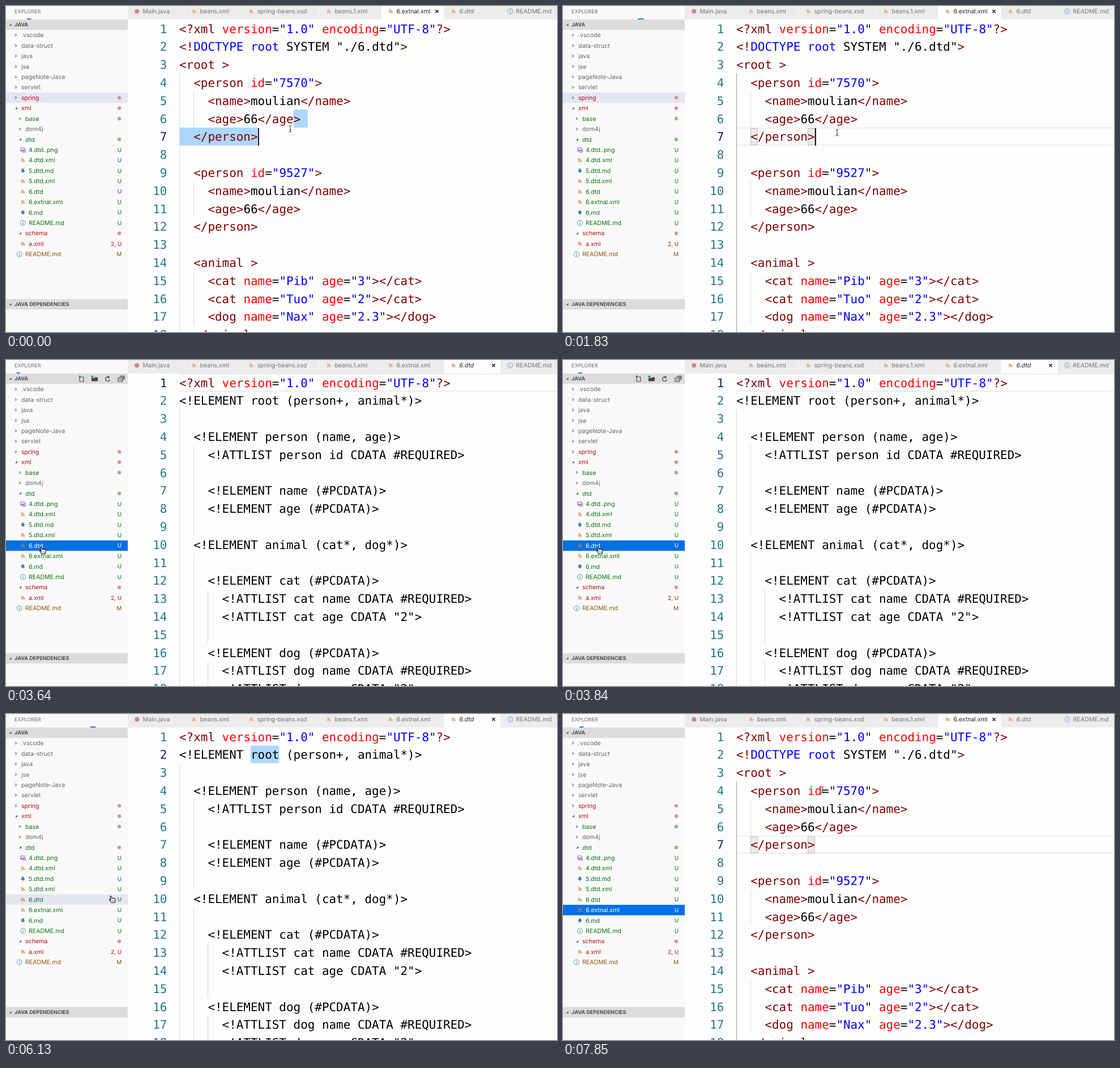
Recreate the animation shown at these times as an HTML page with a canvas. Size 973 by 576 pixels, loop 8 s.

```html
<!DOCTYPE html>
<html>
<head>
<meta charset="utf-8">
<style>
html, body { margin: 0; width: 973px; height: 576px; overflow: hidden; background: #fdfdfd; }
canvas { display: block; }
</style>
</head>
<body>
<canvas id="stage" width="973" height="576"></canvas>
<script>
const c = document.getElementById('stage').getContext('2d');
const LOOP = 8000, X = 306, CW = 12.6, LH = 31.8, ROW = 18.43;
const UI = '10.6px Inter, sans-serif', HEAD = 'bold 9.1px Inter, sans-serif';
const CODE = '20.93px "DejaVu Sans Mono", monospace';
const GREEN = '#0a750a', RED = '#b60d0d', GRAY = '#666', AMBER = '#895503';

// screen updates: [first, last, count]
const UPDATES = [[0, 0, 1], [440, 1360, 7], [1510, 2280, 6], [2610, 3190, 5], [3640, 4640, 7],
  [4790, 5690, 7], [5840, 6870, 8], [7040, 7250, 2], [7520, 7850, 3]];
// pointer path: [time, x, y]
const PATH = [[0, 502, 217], [440, 502, 217], [900, 518, 212], [1360, 490, 222], [1818, 484, 224],
  [2280, 400, 310], [2600, 200, 420], [2900, 66, 338], [3807, 65, 337], [4100, 65, 337],
  [4640, 380, 110], [4900, 460, 74], [5690, 460, 74], [6134, 188, 328], [6430, 188, 328],
  [6800, 100, 354], [7250, 100, 354], [7520, 300, 270], [7850, 458, 134], [LOOP, 458, 134]];

const XML = `<?xml version="1.0" encoding="UTF-8"?>
<!DOCTYPE root SYSTEM "./6.dtd">
<root >
  <person id="7570">
    <name>moulian</name>
    <age>66</age>
  </person>

  <person id="9527">
    <name>moulian</name>
    <age>66</age>
  </person>

  <animal >
    <cat name="Pib" age="3"></cat>
    <cat name="Tuo" age="2"></cat>
    <dog name="Nax" age="2.3"></dog>
  </animal>`.split('\n');

const DTD = `<?xml version="1.0" encoding="UTF-8"?>
<!ELEMENT root (person+, animal*)>

  <!ELEMENT person (name, age)>
    <!ATTLIST person id CDATA #REQUIRED>

    <!ELEMENT name (#PCDATA)>
    <!ELEMENT age (#PCDATA)>

  <!ELEMENT animal (cat*, dog*)>

    <!ELEMENT cat (#PCDATA)>
      <!ATTLIST cat name CDATA #REQUIRED>
      <!ATTLIST cat age CDATA "2">

    <!ELEMENT dog (#PCDATA)>
      <!ATTLIST dog name CDATA #REQUIRED>
      <!ATTLIST dog age CDATA "2">`.split('\n');

// indent guides: [column, first line, last line]
const XML_GUIDES = [[0, 4, 18], [2, 5, 6], [2, 10, 11], [2, 15, 17]];
const DTD_GUIDES = [[0, 3, 18], [2, 5, 9], [2, 11, 18], [4, 13, 15], [4, 17, 18]];

// tree rows: [label, text x, icon, colour, status]
const TREE = [
  ...['.vscode', 'data-struct', 'java', 'jse', 'pageNote-Java', 'servlet'].map(n => [n, 27, 'shut', GRAY]),
  ['spring', 27, 'shut', RED, 'dot'], ['xml', 27, 'open', RED, 'dot'],
  ['base', 34, 'shut', GREEN, 'dot'], ['dom4j', 34, 'shut', GRAY], ['dtd', 34, 'open', GREEN, 'dot'],
  ...[['4.dtd..png', 'image'], ['4.dtd.xml', 'feed'], ['5.dtd.md', 'down'], ['5.dtd.xml', 'feed'],
    ['6.dtd', 'feed'], ['6.extnal.xml', 'feed'], ['6.md', 'down'], ['README.md', 'info']]
    .map(([n, icon]) => [n, 40, icon, GREEN, 'U']),
  ['schema', 34, 'open', RED, 'dot'], ['a.xml', 40, 'feed', RED, '2, U'], ['README.md', 34, 'info', AMBER, 'M']
];
// tabs: [label, left, icon]
const TABS = [['Main.java', 215, 'disc'], ['beans.xml', 316, 'feed'], ['spring-beans.xsd', 417, 'feed'],
  ['beans.1.xml', 554, 'feed'], ['6.extnal.xml', 663, 'feed'], ['6.dtd', 774, 'feed'], ['README.md', 874, 'info']];

const HAND = new Path2D('M-4.3-5.6c.8-1.2 2-.6 2.3.4l.9 2.7 1.5-.3 1.7.4 1.7.5c1.1.4 1.4 1.6 1.3 2.8l-.4 2.2-1 2.2h-5.4l-3.7-4.3c-.8-1.1.4-2.1 1.5-1.2l1 .8z');

function rect(x, y, w, h, color) {
  c.fillStyle = color;
  c.fillRect(x, y, w, h);
}
function text(str, x, y, font, color, align = 'left') {
  c.font = font;
  c.fillStyle = color;
  c.textAlign = align;
  c.fillText(str, x, y);
}
// filled shape, or an outline when a width is given
function path(d, x, y, color, width) {
  c.save();
  c.translate(x, y);
  const p = new Path2D(d);
  c.fillStyle = c.strokeStyle = color;
  if (width) {
    c.lineWidth = width;
    c.stroke(p);
  } else c.fill(p);
  c.restore();
}
function disc(x, y, r, color) {
  c.fillStyle = color;
  c.beginPath();
  c.arc(x, y, r, 0, 7);
  c.fill();
}

const ICONS = {
  shut: (x, y) => path('M-1.3-2.2L1.6 0-1.3 2.2z', x, y, '#777', 0.9),
  open: (x, y) => path('M2-2.2V1.8H-2z', x, y, '#555'),
  feed: (x, y) => {
    path('M-3-2.8A5.8 5.8 0 0 1 2.8 3M-3-.4A3.4 3.4 0 0 1 .4 3', x, y, '#e37933', 1.2);
    disc(x - 2.2, y + 2.2, 0.9, '#e37933');
  },
  down: (x, y) => path('M-2.2-4L0-3 2.2-4V-.2H4.2L0 4-4.2-.2H-2.2z', x, y, '#3f86ad'),
  info: (x, y) => {
    path('M4.6 0A4.6 4.6 0 1 1-4.6 0 4.6 4.6 0 1 1 4.6 0', x, y, '#3f8fba', 0.9);
    path('M0-2.8V-1.5M0-.6V2.8', x, y, '#3f8fba', 1.2);
  },
  image: (x, y) => {
    path('M-4-3.5H2.5V2H-4zM-2 4H4.5V-1.5', x, y, '#8d66b5', 1.1);
    path('M-3.5 1.5L-1.5-1 0 .5 1-.5 2.2 1.5z', x, y, '#8d66b5');
  },
  disc: (x, y) => disc(x, y, 4, '#cc6b6e')
};

function pointerAt(t) {
  const i = Math.max(1, PATH.findIndex(p => p[0] >= t));
  const [t0, x0, y0] = PATH[i - 1], [t1, x1, y1] = PATH[i];
  const k = Math.max(0, (t - t0) / (t1 - t0));
  return [x0 + (x1 - x0) * k, y0 + (y1 - y0) * k];
}

function lastUpdate(t) {
  let s = 0;
  for (const [a, b, n] of UPDATES)
    for (let i = 0; i < n; i++) {
      const u = a + (b - a) * i / Math.max(1, n - 1);
      if (u <= t + 12) s = u;
    }
  return s;
}

function tokenColor(tok, doctype) {
  if (doctype) return tok[0] === 'D' ? '#0000ff' : '#800000';
  if (tok[0] === '"') return '#0000ff';
  return /^[<?\/>]/.test(tok) ? '#800000' : '#ff0000';
}
function codeLine(line, y) {
  const doctype = line.startsWith('<!D');
  const rule = doctype ? /(<!|DOCTYPE root|>)/
    : line.includes('<!') ? /(?!)/ : /("[^"]*"|\w+(?==)|<[?\/]?\w+|[?\/]?>)/;
  let col = 0;
  line.split(rule).forEach((tok, i) => {
    text(tok, X + col * CW, y, CODE, i % 2 ? tokenColor(tok, doctype) : '#000');
    col += tok.length;
  });
}

const lineTop = n => 24 + LH * (n - 1);

function editor(s, dtd, treeFocus) {
  const selecting = s < 1660;
  const current = !dtd ? 7 : s < 5090 ? 1 : 2;
  rect(215, 0, 758, 576, '#fdfdfd');

  if (dtd ? current === 1 : !selecting) {
    rect(X, lineTop(current), 667, 1.4, '#e8e8e8');
    rect(X, lineTop(current) + LH - 1.4, 667, 1.4, '#e8e8e8');
  }
  if (!dtd && selecting) {
    rect(X + 16 * CW, lineTop(6), 2 * CW, LH, '#add6ff');
    rect(X, lineTop(7), 11 * CW, LH, '#add6ff');
  }
  if (dtd && current === 2) rect(X + 10 * CW, lineTop(2), 4 * CW, LH - 0.8, treeFocus ? '#e5ebf1' : '#add6ff');

  for (const [col, a, b] of dtd ? DTD_GUIDES : XML_GUIDES) {
    const active = !dtd && !selecting && col === 0;
    rect(Math.floor(X + col * CW), lineTop(a), 1, LH * (b - a + 1), active ? '#999' : '#dadada');
  }
  if (!dtd && !selecting) for (const col of [2, 10]) {
    const x = Math.floor(X + col * CW);
    rect(x, 216, 13, 30, '#bbb');
    rect(x + 1, 217, 11, 28, '#e7ece7');
  }
  (dtd ? DTD : XML).forEach((line, i) => {
    const y = 47.5 + LH * i;
    text(i + 1, 284.4, y, CODE, i + 1 === current ? '#0b216f' : '#237893', 'right');
    codeLine(line, y);
  });
  const blink = selecting ? s < 500 || s > 1000 : Math.floor((s - 1380) / 500) % 2 === 0;
  if (s < 3640 && blink) rect(X + 11 * CW + 0.4, lineTop(7) + 1, 1.8, LH - 1, '#000');
}

function tabs(dtd) {
  rect(215, 0, 758, 24, '#f4f4f4');
  TABS.forEach(([name, x, icon], i) => {
    const end = i < 6 ? TABS[i + 1][1] : 974;
    const active = i === (dtd ? 5 : 4);
    rect(x, 0, end - x - 1, active ? 24 : 23.5, active ? '#fdfdfd' : '#ececec');
    c.globalAlpha = active ? 1 : 0.8;
    ICONS[icon](x + 16.3, 9.5);
    c.globalAlpha = 1;
    text(name, x + 26.5, 13.3, (i === 5 ? 'italic ' : '') + UI, active ? '#222' : '#757575');
    if (active) path('M-2.6-2.6L2.6 2.6M2.6-2.6L-2.6 2.6', end - 13, 9.5, '#333', 1.6);
  });
}

function section(name, y) {
  rect(0, y, 215, 18.4, '#dcdcdc');
  ICONS.open(7.5, y + 9.2);
  text(name, 15, y + 12.5, HEAD, '#4c4c4c');
}
function actions() {
  path('M-3-2V5H4V-3H0', 133, 33, '#444', 1.1);
  path('M-5-3.5H0M-2.5-6V-1', 133, 33, '#2d8a3e', 1.5);
  path('M-5-1H0L1-2.5H6V4.5H-5z', 156, 33, '#444');
  path('M-6-3.5H-1M-3.5-6V-1', 156, 33, '#2d8a3e', 1.5);
  path('M3.2-2.4A4 4 0 1 0 4 1', 179.5, 33.5, '#444', 1.3);
  path('M0-5.5L4-3.2 0-.8z', 179.5, 33.5, '#444');
  path('M-5-1.5H2.5V4.5H-5zM-3 1.5H.7M-3-3.5H4.3V2.5M-1-5.3H6V.5', 203, 33.5, '#444', 1.1);
}

function sidebar(s, focus) {
  // hover follows the pointer with a short delay
  const [hx, hy] = pointerAt(s - 60);
  const inside = hx < 215;
  const selected = s < 3640 ? 6 : s < 7040 ? 15 : 16;
  const hover = inside ? Math.round((hy - 5 - 51.5) / ROW) : -1;
  rect(0, 0, 215, 576, '#f9f9f9');
  text('EXPLORER', 15, 12.7, '9.1px Inter, sans-serif', '#6b6b6b');
  section('JAVA', 23.8);
  section('JAVA DEPENDENCIES', 517.8);
  if (inside) actions();

  TREE.forEach(([name, x, icon, color, status], i) => {
    const y = 51.5 + ROW * i, lit = i === selected && focus;
    if (i === selected) rect(0, y - ROW / 2, 215, ROW, lit ? '#0070e5' : '#e4e6f1');
    else if (i === hover) rect(0, y - ROW / 2, 215, ROW, '#e8e8e8');
    const ink = lit ? '#fff' : color;
    ICONS[icon](x - (icon === 'shut' || icon === 'open' ? 9 : 10.2), y);
    text(name, x, y + 3.8, UI, ink);
    if (status === 'dot') disc(200, y, 3.2, color === RED ? '#dd9494' : '#92b992');
    else if (status) text(status, 204.3, y + 3.5, '10px Inter, sans-serif', ink, 'right');
  });

  // indeterminate progress bar: widens to the middle, then narrows again
  const p = (s / 4000 + 0.18) % 1, unit = 4.3;
  const mid = unit * (0.5 + (p < 0.5 ? p * 50 : 25 + (p - 0.5) * 48));
  const w = unit * (3 - 4 * Math.abs(p - 0.5));
  rect(mid - w / 2, 22, w, 1.8, '#0e70c0');
}

function pointer(s) {
  const [x, y] = pointerAt(s);
  if (x >= 215) {
    path('M-2.5-5.5Q0-5.5 0-4Q0-5.5 2.5-5.5M0-4.5V4.5M-2.5 5.5Q0 5.5 0 4Q0 5.5 2.5 5.5M-1.2 1.5H1.2', x, y, '#333', 1);
    return;
  }
  c.save();
  c.translate(x, y);
  c.fillStyle = '#fff';
  c.fill(HAND);
  c.strokeStyle = '#111';
  c.lineWidth = 1.1;
  c.stroke(HAND);
  path('M-.6 1.2V3.6M1.2 1.2V3.6M3 1.2V3.6', 0, 0, '#333', 0.7);
  c.restore();
}

function draw(now) {
  const s = lastUpdate(now % LOOP);
  const dtd = s >= 3640 && s < 7040;
  const treeFocus = (s >= 3640 && s < 5090) || s >= 6428;
  editor(s, dtd, treeFocus);
  tabs(dtd);
  sidebar(s, treeFocus);
  pointer(s);
  requestAnimationFrame(draw);
}
c.textRendering = 'geometricPrecision';
requestAnimationFrame(draw);
</script>
</body>
</html>
```
